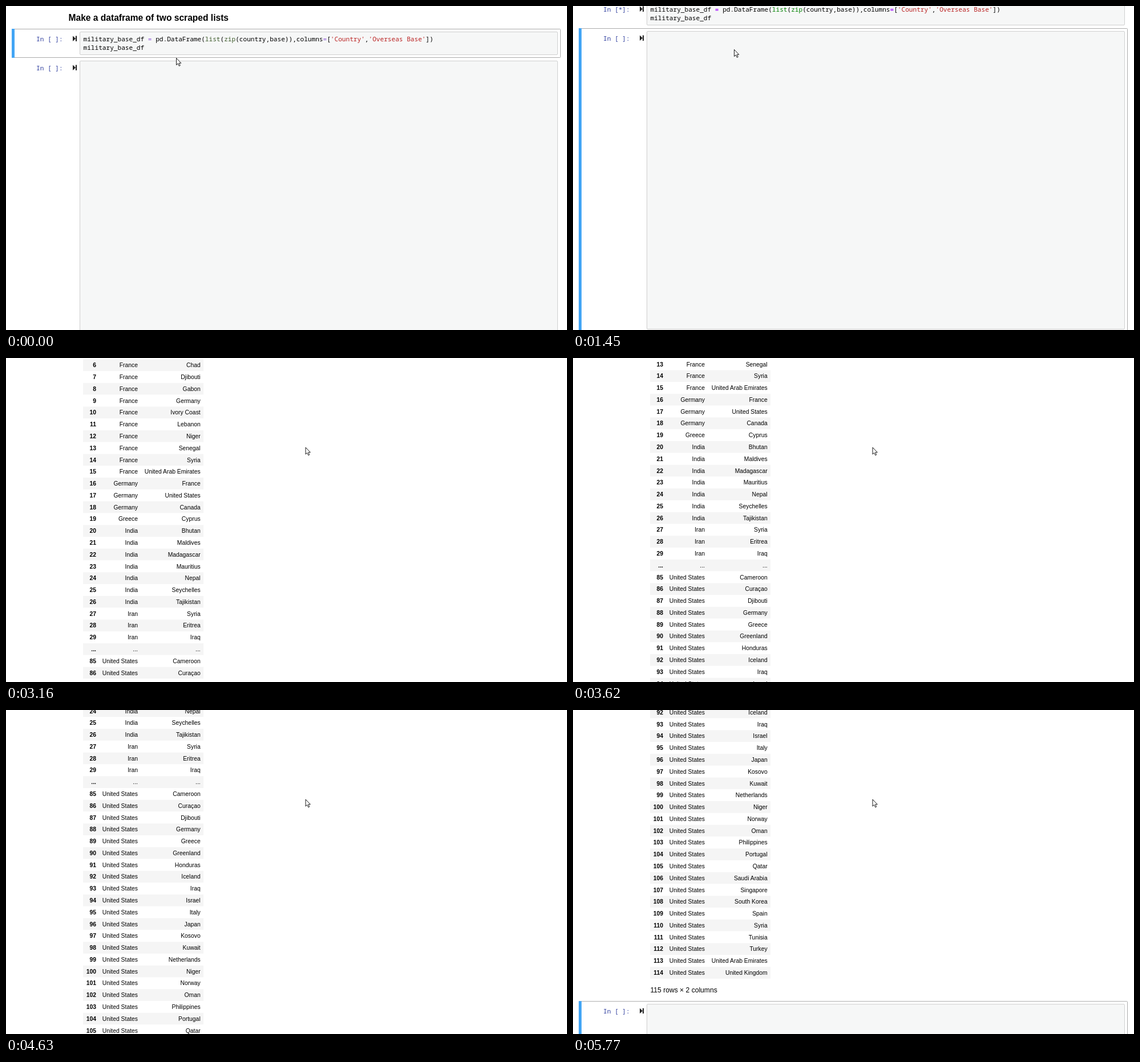
Animation of 983 by 569 pixels, one loop 6.51 s. Source, as an HTML page:

```html
<!DOCTYPE html>
<html lang="en">
<head>
<meta charset="utf-8">
<title>Notebook dataframe</title>
<style>
  html, body { margin: 0; width: 100%; height: 100%; overflow: hidden; background: #fff; }
  svg { display: block; width: 983px; height: 569px; }
  text { font: 10.37px "Liberation Sans", Arial, sans-serif; fill: #000; white-space: pre; }
  .mono { font: 11.12px "Noto Sans Mono", "DejaVu Sans Mono", monospace; }
  .title { font-size: 15.58px; font-weight: bold; }
  .note { font-size: 12.12px; }
  .end { text-anchor: end; }
  .bold { font-weight: bold; }
  .in { fill: #303f9f; }
  .out { fill: #d84315; }
  .op { fill: #a2f; font-weight: bold; }
  .fn { fill: #008000; }
  .str { fill: #ba2121; }
  .idle .op { fill: #8a4fd8; font-weight: normal; }
  .idle .fn { fill: #3c5a2a; }
  .box { fill: #f6f7f7; stroke: #cfcfcf; }
  .frame { fill: #fff; stroke: #ababab; }
  .bar { fill: #42a5f5; }
  .edit .frame { stroke: #66bb6a; }
  .edit .bar { fill: #66bb6a; }
</style>
</head>
<body>
<svg viewBox="0 0 983 569">
  <g id="page">
    <text class="title" x="109.5" y="26">Make a dataframe of two scraped lists</text>
    <g id="code"></g>
    <g id="output"></g>
    <g id="next"></g>
  </g>
  <path id="arrow" d="M.5 .5V12.6L3.2 10 5.3 14.4 7.2 13.5 5.2 9.3H8.8Z" fill="#fff" stroke="#000" stroke-width=".9"/>
  <path id="beam" d="M-3 -7.5H-.8L0 -7 .8 -7.5H3M0 -7V7M-3 7.5H-.8L0 7 .8 7.5H3" fill="none" stroke="#000"/>
</svg>
<script>
const LOOP = 6510, CLICK = 420, RUN = 1450, DONE = 1520, STEP = 62;
const ROW_H = 20.78, TABLE_TOP = 122, NOTCH = 96.2;
const $ = id => document.getElementById(id);
const text = (x, y, cls, s) => `<text x="${x}" y="${y}" class="${cls}">${s}</text>`;
const span = (cls, s) => `<tspan class="${cls}">${s}</tspan>`;

// Cell with its selection frame, prompt, run icon and input box
const cell = (id, top, bottom, inner) => `
  <g id="${id}Sel">
    <rect class="frame" x="10.5" y="${top + .5}" width="961" height="${bottom - top - 1}" rx="1"/>
    <rect class="bar" x="10" y="${top}" width="5" height="${bottom - top}"/>
  </g>
  <text id="${id}Prompt" class="mono in" x="53" y="${top + 22}">In [ ]:</text>
  <path d="M117 ${top + 12.5}l5 4.7v-4.7h2v9.4h-2v-4.7l-5 4.7z" fill="#222"/>
  <rect class="box" x="129.5" y="${top + 5.5}" width="837" height="${bottom - top - 11}" rx="1.5"/>
  ${inner}`;

$("code").innerHTML = cell("code", 40, 91,
  text(135.5, 62, "mono",
    "military_base_df " + span("op", "=") + " pd.DataFrame(" + span("fn", "list") + "(" + span("fn", "zip") +
    "(country,base)),columns" + span("op", "=") + "[" + span("str", "'Country'") + "," +
    span("str", "'Overseas Base'") + "])") +
  text(135.5, 76.5, "mono", "military_base_df") +
  '<rect id="caret" x="242.5" y="65" width="1" height="15"/>');
$("next").innerHTML = cell("next", 91, 625, "");

const runs = [["Australia", 2], ["China", 4], ["France", 10], ["Germany", 3], ["Greece", 1],
  ["India", 7], ["Iran", 3], ["...", 1], ["United States", 30]];
const countries = runs.flatMap(([name, n]) => Array(n).fill(name));
const bases = ("Malaysia,United Arab Emirates,Afghanistan,Cambodia,Djibouti,Tajikistan,Chad,Djibouti,Gabon," +
  "Germany,Ivory Coast,Lebanon,Niger,Senegal,Syria,United Arab Emirates,France,United States,Canada," +
  "Cyprus,Bhutan,Maldives,Madagascar,Mauritius,Nepal,Seychelles,Tajikistan,Syria,Eritrea,Iraq,...," +
  "Cameroon,Curaçao,Djibouti,Germany,Greece,Greenland,Honduras,Iceland,Iraq,Israel,Italy,Japan,Kosovo," +
  "Kuwait,Netherlands,Niger,Norway,Oman,Philippines,Portugal,Qatar,Saudi Arabia,Singapore,South Korea," +
  "Spain,Syria,Tunisia,Turkey,United Arab Emirates,United Kingdom").split(",");

const rows = bases.map((base, i) => {
  const y = TABLE_TOP + i * ROW_H, label = i < 30 ? i : i > 30 ? i + 54 : "...";
  return `<rect class="row" x="135" y="${y}" width="211" height="${ROW_H}" fill="${i % 2 ? "#fff" : "#f5f5f5"}"/>` +
    text(158, y + 14, "end bold", label) + text(231, y + 14, "end", countries[i]) + text(340.7, y + 14, "end", base);
}).join("");
$("output").innerHTML = text(78, 101, "mono out", "Out[4]:") +
  text(231, 114.8, "end bold", "Country") + text(340.7, 114.8, "end bold", "Overseas Base") + rows +
  '<rect x="135" y="121" width="211" height="1"/>' + text(135.5, 1414, "note", "115 rows × 2 columns");
const rowRects = [...document.querySelectorAll(".row")];

// Share of a move reached at time t, held between samples
const stepped = (t, start, shares) =>
  t < start ? 0 : shares[Math.min(shares.length - 1, Math.floor((t - start) / STEP))];

const notches = [2720, 2970, 3220, 3550, 3860, 4440, 4870, 5240, 5580];
const scrollAt = t => t < RUN ? 0 :
  52 + NOTCH * notches.reduce((sum, n) => sum + stepped(t, n, [.035, .53, .94, 1]), 0);

function pointerAt(t) {
  const a = stepped(t, 80, [.08, .25, .45, .65, .82, .93, .98, 1]);
  const b = stepped(t, 2090, [.06, .3, .65, .93, 1]);
  return [298 - 16 * a + 242.5 * b, 91 - 15 * a + 80.5 * b];
}

const show = (id, on) => $(id).setAttribute("visibility", on ? "visible" : "hidden");

function draw(t) {
  const scroll = scrollAt(t), [x, y] = pointerAt(t);
  const editing = t >= CLICK && t < RUN, done = t >= DONE;
  $("page").setAttribute("transform", `translate(0 ${-scroll})`);
  $("code").setAttribute("class", editing ? "edit" : t < CLICK ? "idle" : "");
  $("codePrompt").textContent = `In [${done ? 4 : t >= RUN ? "*" : " "}]:`;
  $("next").setAttribute("transform", `translate(0 ${done ? 1338 : 0})`);
  show("codeSel", t < RUN);
  show("nextSel", t >= RUN);
  show("caret", editing && t < 950);
  show("output", done);

  const hover = done && x > 135 && x < 346 ? Math.floor((y + scroll - TABLE_TOP) / ROW_H) : -1;
  rowRects.forEach((r, i) => r.setAttribute("fill", i === hover ? "#d9edfd" : i % 2 ? "#fff" : "#f5f5f5"));

  const inText = t < RUN && y < 85;
  show("arrow", !inText);
  show("beam", inText);
  $(inText ? "beam" : "arrow").setAttribute("transform", `translate(${x} ${y})`);
}

const t0 = performance.now();
function tick() {
  draw((performance.now() - t0) % LOOP);
  requestAnimationFrame(tick);
}
tick();
</script>
</body>
</html>
```
